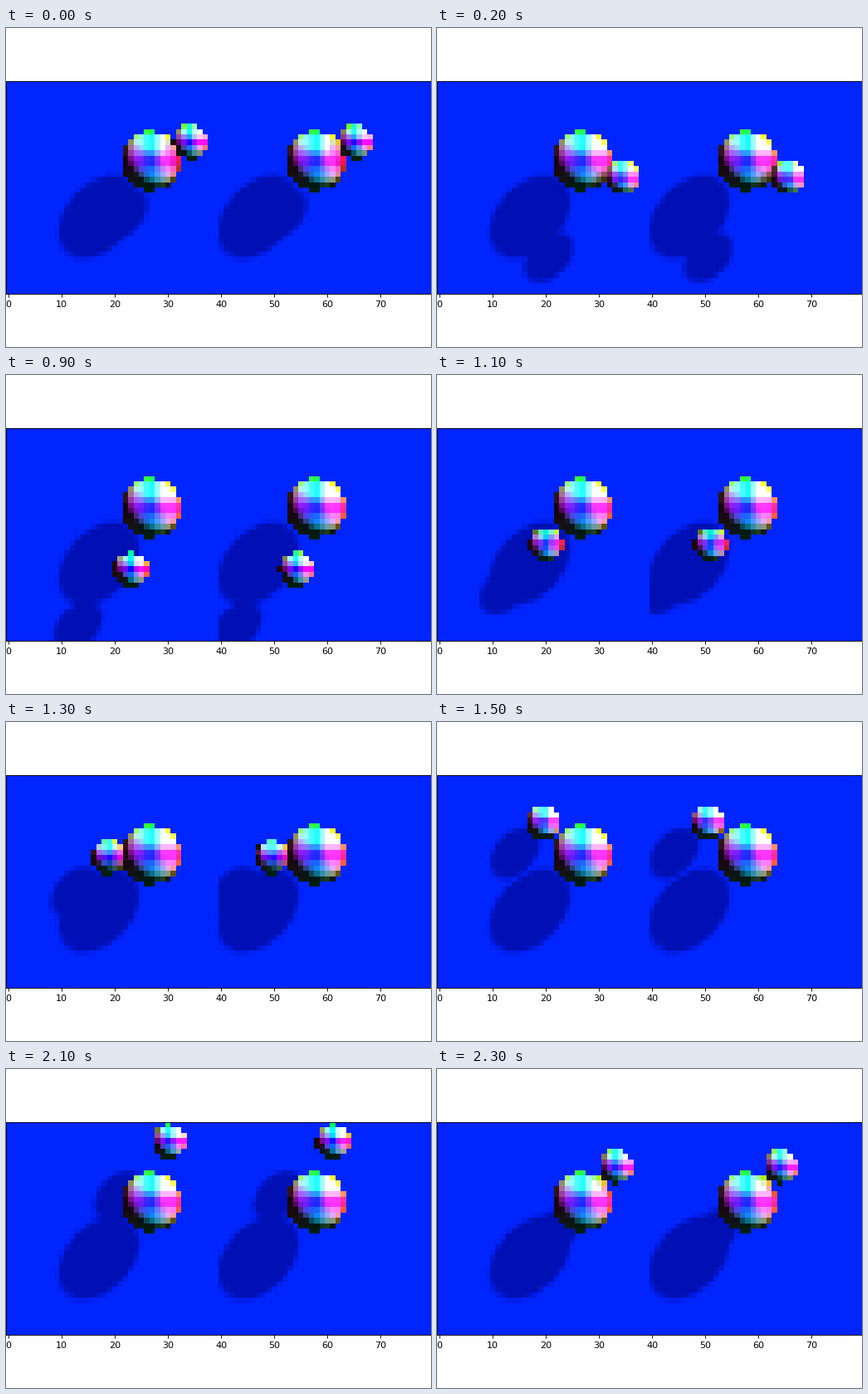
Write a matplotlib script that moves like this. It is 512x384 px and loops after 2400 ms.

```python
import numpy as np
import matplotlib.pyplot as plt
from matplotlib.animation import FuncAnimation

FRAMES, INTERVAL = 24, 100
ROWS, HALF = 40, 40                       # cells of one eye's view
LIGHT = np.array([0.5, -0.54, 0.68])
LIGHT /= np.linalg.norm(LIGHT)
FLOOR_Z = -13.2
LIT = np.array([0, 37, 255]) / 255
SHADED = np.array([0, 16, 180]) / 255
BIG, BIG_R, SMALL_R = np.array([27.2, 15.0, 0.0]), 5.6, 3.2


def orbit(a):
    """Centre of the small ball in left-view cells, x right and y down."""
    c, s = np.cos(a), np.sin(a)
    return np.array([27.1 + 7.9 * c + 0.4 * s,
                     15.1 + 13.05 * s - 0.3 * c,
                     4.9 * c + 3.2 * s])


def sunlight(points, center, radius):
    """1 in the open, 0 in the ball's shadow, with a soft rim."""
    w = center - points
    t = w @ LIGHT
    d = np.linalg.norm(w - t[..., None] * LIGHT, axis=-1)
    return np.where(t > 0, np.clip(d - radius, 0, 1), 1)


def view(first_col, ball_shift, small_shift, floor_shift, small):
    """One eye's image: floor, then each ball, nearest surface on top."""
    x, y = np.meshgrid(first_col + np.arange(HALF) + 0.5,
                       np.arange(ROWS) + 0.5)
    floor = np.dstack([x - floor_shift, y, np.full_like(x, FLOOR_Z)])
    sun = np.minimum(sunlight(floor, BIG, BIG_R),
                     sunlight(floor, small, SMALL_R))[..., None]
    img = SHADED + (LIT - SHADED) * sun
    depth = floor[..., 2].copy()

    balls = [(BIG, BIG_R, ball_shift), (small, SMALL_R, small_shift)]
    for (center, radius, shift), (other, other_r, _) in zip(balls, balls[::-1]):
        dx, dy = x - shift - center[0], y - center[1]
        dz = np.sqrt(np.maximum(radius ** 2 - dx ** 2 - dy ** 2, 0))
        normal = np.dstack([dx, dy, dz]) / radius
        sun = 0.5 + 0.5 * sunlight(center + normal * radius, other, other_r)
        gain = 0.12 + 2.7 * np.maximum(normal @ LIGHT, 0) * sun
        color = np.clip(np.abs(normal) * gain[..., None], 0, 1)
        z = center[2] + dz
        seen = (dx ** 2 + dy ** 2 <= radius ** 2) & (z > depth)
        img[seen] = color[seen]
        depth[seen] = z[seen]
    return img


def render(i):
    a = 2 * np.pi * (i - 1) / FRAMES
    small = orbit(a)
    parallax = 31 + 0.28 * np.sin(a) + 0.15 * np.cos(a)
    return np.hstack([view(0, 0, 0, 0, small),
                      view(HALF, 31, parallax, 30, small)])


fig, ax = plt.subplots(figsize=(6.4, 4.8), dpi=80)
fig.subplots_adjust(left=0, right=1, bottom=0, top=1)
image = ax.imshow(render(0), interpolation="nearest")


def update(i):
    image.set_data(render(i))
    return [image]


anim = FuncAnimation(fig, update, frames=FRAMES, interval=INTERVAL,
                     repeat=True, repeat_delay=0)
plt.show()
```
